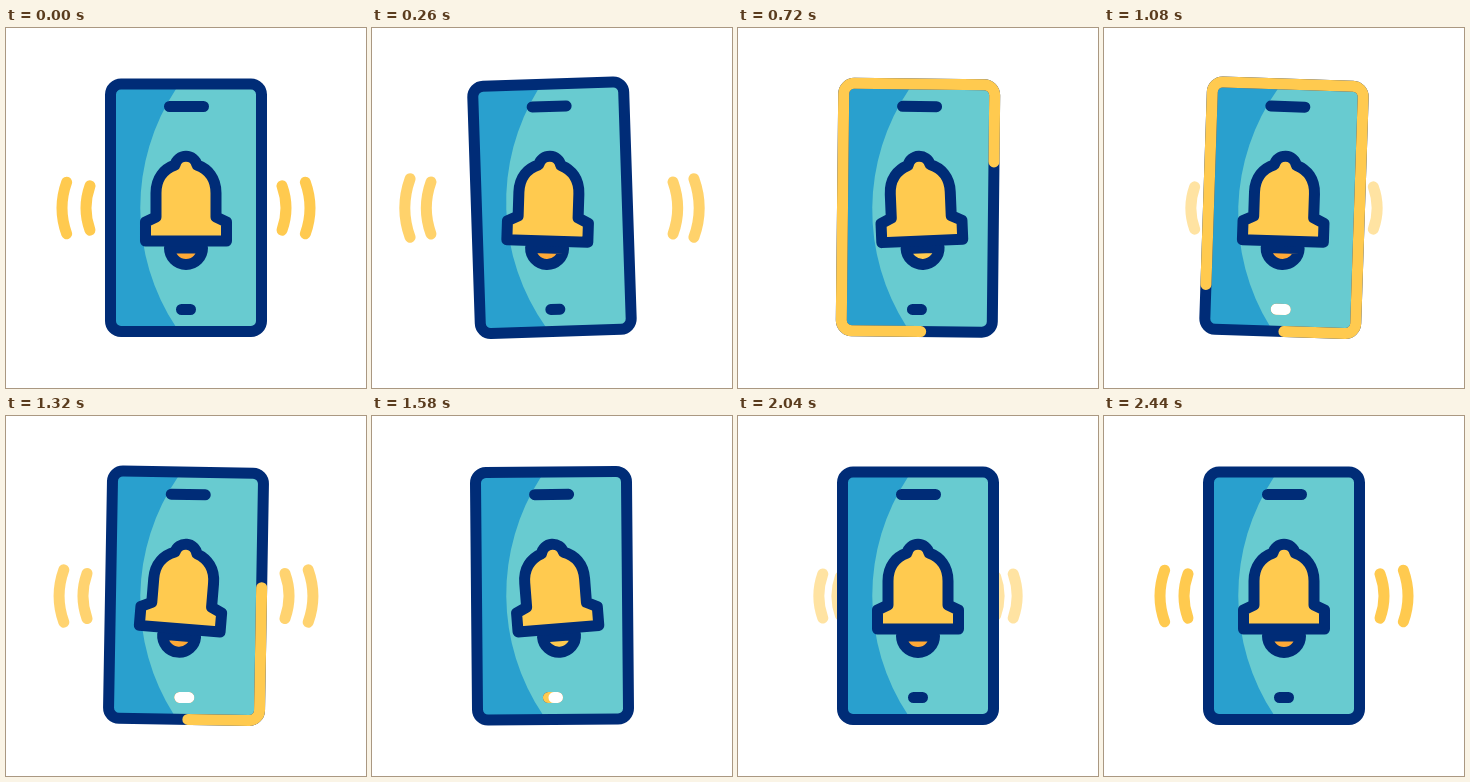
Recreate the animation shown at these times as an HTML page. Size 360 px wide and 360 px high, loop 2600 ms.

```html
<!DOCTYPE html>
<html lang="en">
<head>
<meta charset="utf-8">
<title>Ringing phone</title>
<style>
  html, body { margin: 0; height: 100%; overflow: hidden; background: #fff; }
  svg { display: block; width: 100%; height: 100%; }
  .line { fill: none; stroke: #002c77; stroke-width: 11; stroke-linecap: round; stroke-linejoin: round; }
  .yellow { stroke: #ffca4f; }
  .white { stroke: #fff; }
</style>
</head>
<body>
<svg viewBox="0 0 360 360">
  <g id="waves">
    <path class="line yellow"/><path class="line yellow"/>
    <path class="line yellow"/><path class="line yellow"/>
  </g>
  <g id="phone">
    <rect x="104.5" y="56" width="151" height="247.5" rx="10.5" fill="#68cbd0"/>
    <path d="M170 61A216 216 0 0 0 170 299H108V61Z" fill="#29a0ce"/>
    <rect class="line" x="104.5" y="56" width="151" height="247.5" rx="10.5"/>
    <path id="trim" class="line yellow" pathLength="1"
      d="M184 303.5H115a10.5 10.5 0 0 1-10.5-10.5V66.5A10.5 10.5 0 0 1 115 56H245a10.5 10.5 0 0 1 10.5 10.5V293a10.5 10.5 0 0 1-10.5 10.5Z"/>
    <path class="line" d="M163.5 78.500H197.500M175.500 281.500H184.500"/>
    <path id="buttonYellow" class="line yellow" d="M175.500 281.500H184.500"/>
    <path id="buttonWhite" class="line white"/>
    <g id="bell">
      <path id="clapper" class="line" d="M163.500 220a16.500 16.500 0 0 0 33 0Z"/>
      <path class="line" style="fill:#ffca4f"
        d="M150 189V165C150 150 158 141 169 137A11.300 11.300 0 0 1 191 137C202 141 210 150 210 165V189L220.500 194V213H139.500V194Z"/>
    </g>
  </g>
</svg>
<script>
const LOOP = 2600;
const $ = id => document.getElementById(id);
const clamp = x => Math.min(1, Math.max(0, x));
const smooth = (t, a, b) => { const u = clamp((t - a) / (b - a)); return u * u * (3 - 2 * u); };

// Smooth curve through [time, value] points, flat at both ends.
function track(t, points) {
  const last = points.length - 1;
  if (t <= points[0][0]) return points[0][1];
  if (t >= points[last][0]) return points[last][1];
  const i = points.findIndex(p => p[0] > t) - 1;
  const slope = k => k <= 0 || k >= last ? 0 :
    (points[k + 1][1] - points[k - 1][1]) / (points[k + 1][0] - points[k - 1][0]);
  const [t0, v0] = points[i], [t1, v1] = points[i + 1];
  const d = t1 - t0, u = (t - t0) / d, w = 1 - u;
  return v0 * w * w * (1 + 2 * u) + v1 * u * u * (3 - 2 * u)
    + d * u * w * (slope(i) * w - slope(i + 1) * u);
}

const phoneTilt = [[0, 0], [290, -2], [500, -1.1], [720, .6], [1070, 1.9], [1580, -.5], [1780, -2], [2040, 0]];
const bellTilt = [[0, 0], [300, 4], [500, 1], [720, -3], [850, -4], [1080, 0], [1300, 4], [1580, -4], [1800, 2], [2040, 0]];

// Each burst: distance of the outer and inner arcs from the centre, and opacity.
const bursts = [
  { end: 800, outer: [[0, 124], [500, 183], [640, 205]], inner: [[0, 100], [500, 165], [640, 188]],
    alpha: [[0, 1], [250, .85], [500, .4], [620, 0]] },
  { end: 1750, outer: [[1000, 76], [1080, 93], [1300, 124], [1560, 156]], inner: [[1000, 60], [1080, 72], [1300, 100], [1560, 136]],
    alpha: [[1000, .2], [1080, .52], [1250, 1], [1550, 0]] },
  { end: LOOP, outer: [[1940, 76], [2040, 99], [2160, 113], [2440, 124]], inner: [[1940, 66], [2040, 81], [2160, 91], [2440, 100]],
    alpha: [[1940, .2], [2040, .52], [2240, .9], [2440, 1]] }
];

function drawWaves(t) {
  const burst = bursts.find(b => t < b.end);
  const arcs = $("waves").children;
  $("waves").setAttribute("opacity", clamp(track(t, burst.alpha)));
  [burst.outer, burst.inner].forEach((points, i) => {
    const dist = track(t, points), half = 22 + .15 * (dist - 99), bend = half * .36;
    [-1, 1].forEach((side, j) => {
      const x = 180 + side * (dist - bend / 2);
      arcs[i * 2 + j].setAttribute("d", `M${x} ${180 - half}q${side * bend} ${half} 0 ${2 * half}`);
    });
  });
}

function draw(t) {
  drawWaves(t);
  const swing = track(t, bellTilt);
  $("phone").setAttribute("transform", `rotate(${track(t, phoneTilt)} 180 180)`);
  $("bell").setAttribute("transform", `rotate(${swing} 180 125)`);
  $("clapper").style.fill = swing < -1.5 ? "#ffca4f" : "#ffa936";

  const head = smooth(t, 360, 930), tail = smooth(t, 940, 1510), trim = $("trim");
  trim.style.display = head > tail ? "" : "none";
  trim.style.strokeDasharray = `${head - tail} 2`;
  trim.style.strokeDashoffset = -tail;

  const shown = t > 850 && t < 1800;
  $("buttonYellow").setAttribute("opacity", shown ? smooth(t, 850, 950) * (1 - smooth(t, 1680, 1800)) : 0);
  $("buttonWhite").setAttribute("opacity", t < 1640 ? smooth(t, 900, 1000) : 0);
  $("buttonWhite").setAttribute("d", `M${175.5 + 9 * smooth(t, 1500, 1640)} 281.5H184.6`);
}

function tick(now) {
  draw(now % LOOP);
  requestAnimationFrame(tick);
}
draw(0);
requestAnimationFrame(tick);
</script>
</body>
</html>
```
